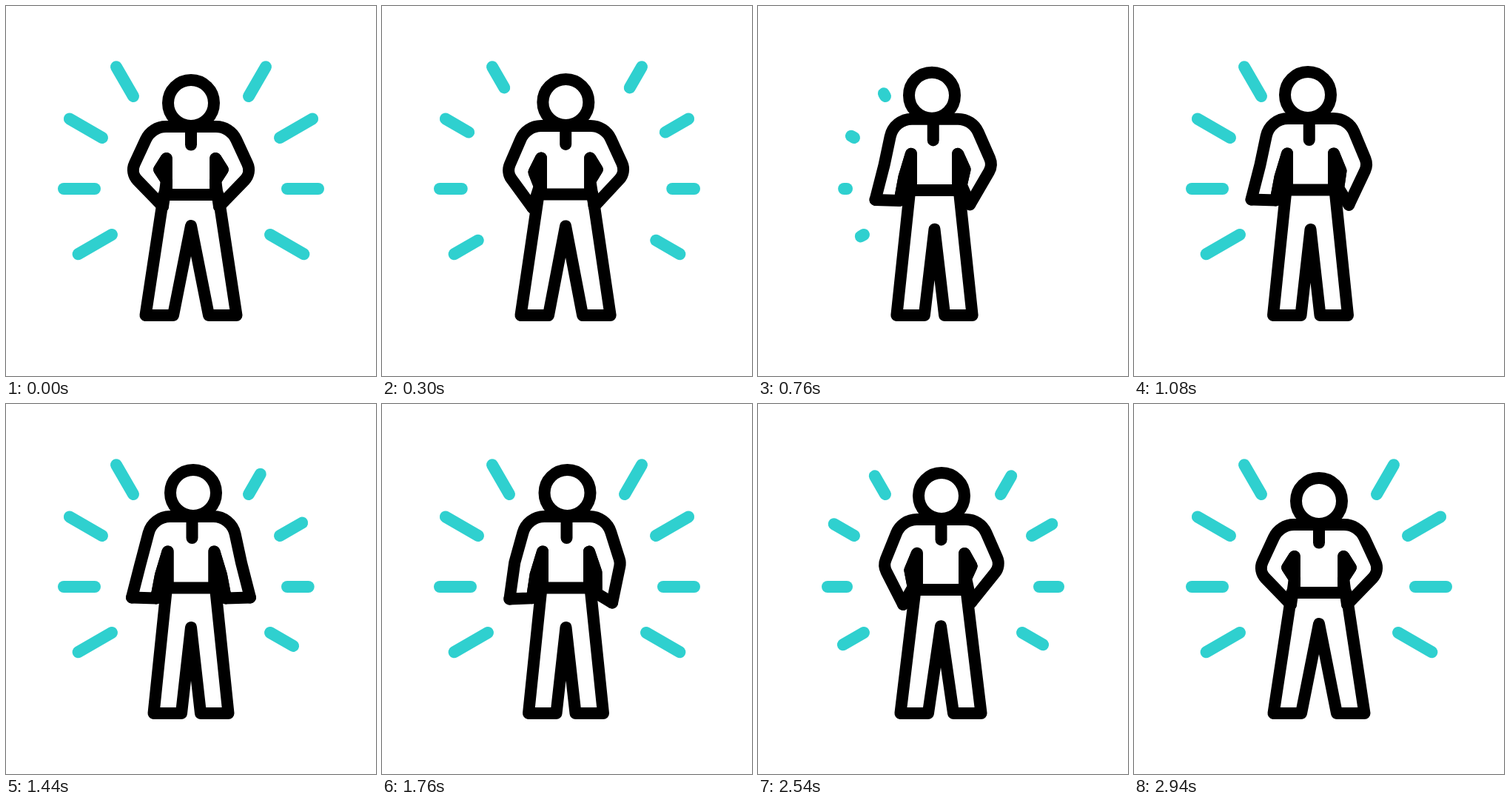
Recreate the animation shown at these times as an HTML page with a canvas. Size 500 by 500 pixels, loop 3 s.

```html
<!DOCTYPE html>
<html lang="en">
<head>
<meta charset="utf-8">
<title>Confident pose</title>
<style>
html, body { margin: 0; width: 100%; height: 100%; overflow: hidden; background: #fff; }
canvas { display: block; width: 500px; height: 500px; }
</style>
</head>
<body>
<canvas id="stage" width="500" height="500"></canvas>
<script>
const ctx = document.getElementById('stage').getContext('2d');
const LOOP = 3000, STEP = 20, CENTER = 250, FOOT = 418;
const BLACK = '#000', TEAL = '#2fd0cf';

// Inner end (distance from the centre line, height) and length of each ray.
const rays = [[78, 122, 46], [120, 178, 51], [130, 247, 42], [107, 309, 52.5]];

const ramp = (t, a, b) => Math.min(1, Math.max(0, (t - a) / (b - a)));
const ease = (t, a, b) => { const u = ramp(t, a, b); return u * u * (3 - 2 * u); };

function stroke(points, close) {
  ctx.beginPath();
  points.forEach(([x, y]) => ctx.lineTo(x, y));
  if (close) ctx.closePath();
  ctx.stroke();
}

// The body straightens up, shifts aside, opens both arms and returns.
function poseAt(t) {
  const swing = ease(t, 1080, 1440), back = ease(t, 1440, 2080), settle = ease(t, 2540, 2940);
  return {
    lift: ease(t, 180, 860) - ease(t, 2260, 2940),
    hips: CENTER + 11.5 * (swing - ease(t, 180, 640)) - 3 * (back - settle),
    head: CENTER - 15 * ease(t, 180, 760) + 18 * swing - 5 * back + 2 * settle,
    left: ease(t, 180, 660) - ramp(t, 1640, 2940),
    right: 0.33 * ease(t, 180, 1080) + 0.67 * swing - 0.83 * back - 0.17 * ease(t, 2080, 2940)
  };
}

// open: 0 is hand on hip, 1 is arm hanging straight.
function drawArm(body, side, open) {
  const { hips, neck, top, waist, half } = body;
  const at = (x, y) => [hips + side * x, y];
  const corner = [neck + side * 53, top];
  const elbow = at(82 - 14 * open, top + 62.5);
  const hand = at(38 + 42 * open, waist + 16 - 3 * open + 6 * Math.sin(Math.PI * open));
  const wristY = waist - 19 + 33 * Math.sin(Math.PI * open / 2);
  const pitY = waist - 49;

  ctx.beginPath();
  ctx.moveTo(neck, top);
  ctx.arcTo(...corner, ...elbow, 30);
  ctx.arcTo(...elbow, ...hand, 20);
  ctx.lineTo(...hand);
  ctx.stroke();

  const inner = [
    at(33 + 14 * open, wristY), at(half + 9.5, (pitY + wristY) / 2),
    at(half, pitY), at(half, waist)
  ];
  stroke([hand, ...inner]);
  stroke(inner, true);
  ctx.fill();
}

function drawBody({ lift, hips, head, left, right }) {
  const headY = 131 - 11 * lift;
  const body = {
    hips, neck: (head + hips) / 2, top: headY + 32,
    waist: 255 - 6.5 * lift, half: 33.3 - 1.8 * lift
  };
  const { neck, top, waist } = body;
  ctx.strokeStyle = ctx.fillStyle = BLACK;

  ctx.beginPath();
  ctx.arc(head, headY, 31, 0, Math.PI * 2);
  ctx.stroke();

  stroke([[neck, top], [neck, waist - 67.5]]);
  drawArm(body, -1, left);
  drawArm(body, 1, right);

  const hip = 36.8 - 3.8 * lift, heel = 61.5 - 11 * lift, toe = heel - 37.5;
  stroke([
    [hips - hip, waist], [hips - heel, FOOT], [hips - toe, FOOT],
    [hips, 297 + 5 * lift],
    [hips + toe, FOOT], [hips + heel, FOOT], [hips + hip, waist]
  ], true);
}

function drawRays(side, from, to) {
  if (to - from < 0.005) return;
  ctx.strokeStyle = TEAL;
  rays.forEach(([x, y, size], i) => {
    const angle = (60 - 30 * i) * Math.PI / 180;
    const at = u => [
      CENTER + side * (x + size * u * Math.cos(angle)),
      y - size * u * Math.sin(angle)
    ];
    stroke([at(from), at(to)]);
  });
}

function draw(t) {
  ctx.fillStyle = '#fff';
  ctx.fillRect(0, 0, 500, 500);
  ctx.lineWidth = 16;
  ctx.lineCap = ctx.lineJoin = 'round';

  const gone = ease(t, 175, 525);
  const dip = 0.23 * (1 - Math.cos(2 * Math.PI * ramp(t, 1840, 2940)));
  [[-1, 700], [1, 1240]].forEach(([side, begin]) => {
    if (gone < 1) drawRays(side, gone, 1);
    else drawRays(side, 0, ease(t, begin, begin + 320) - dip);
  });
  drawBody(poseAt(t));
}

const start = performance.now();
function frame() {
  const t = (performance.now() - start) % LOOP;
  draw(Math.floor(t / STEP) * STEP);
  requestAnimationFrame(frame);
}
frame();
</script>
</body>
</html>
```
